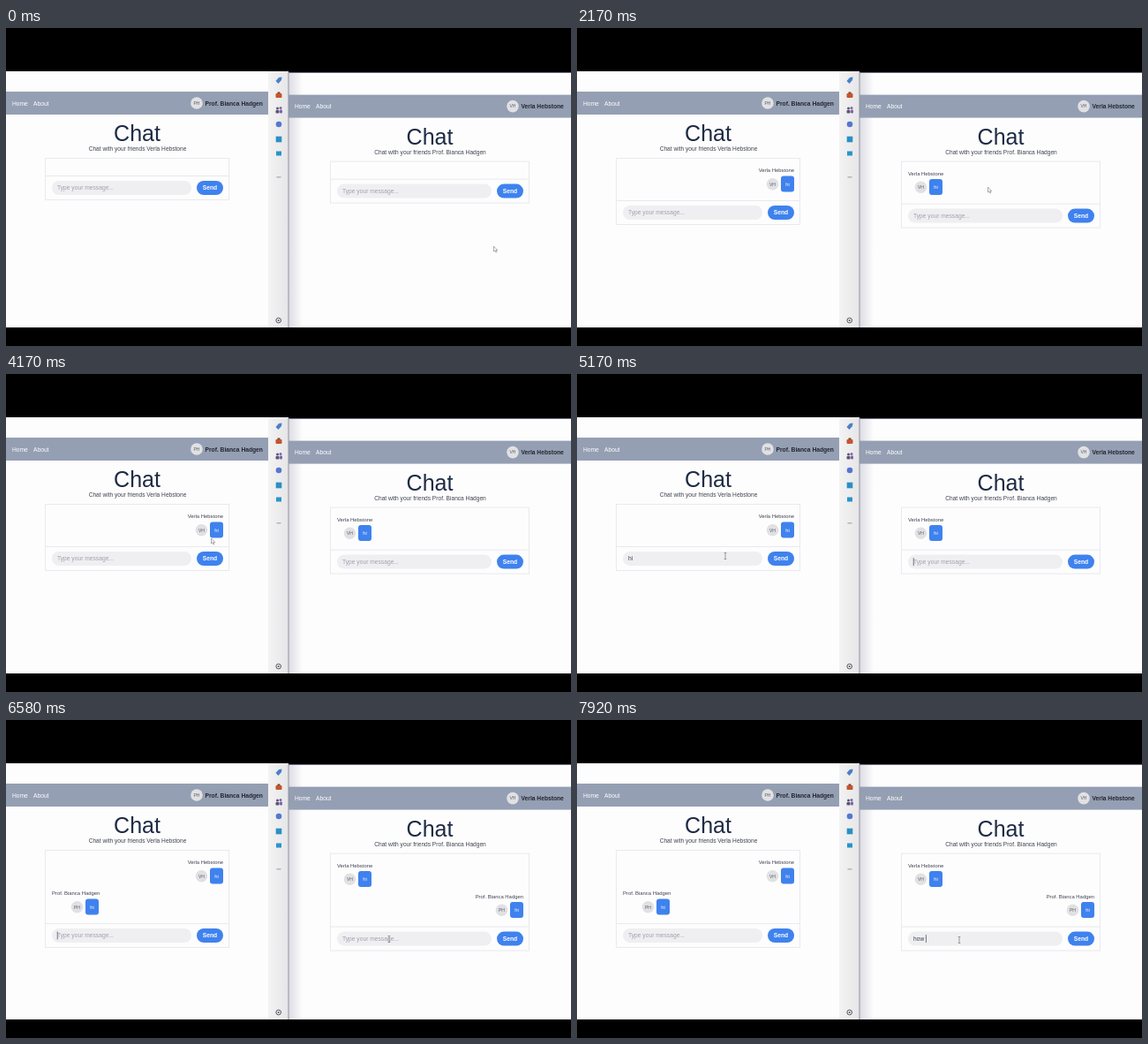
Write an HTML page that moves like this. It is 640 by 360 pixels and loops after 8 s.

```html
<!DOCTYPE html>
<html lang="en">
<head>
<meta charset="utf-8">
<title>Chat</title>
<style>
  html, body { margin: 0; width: 100%; height: 100%; overflow: hidden; background: #000; }
  svg { display: block; width: 640px; height: 360px; font: 6.7px "Liberation Sans", Arial, sans-serif; }
  text { white-space: pre; fill: #3f4450; }
  .title { font-size: 25px; fill: #1e2b45; }
  .sub { font-size: 6.6px; }
  .bold { font-weight: bold; fill: #23262f; }
  .link, .send { fill: #fff; }
  .send { font-weight: bold; }
  .name { font-size: 5.9px; }
  .mid { text-anchor: middle; }
  .end { text-anchor: end; }
  .initials { font-size: 5px; fill: #5a5d68; }
  .line { fill: none; stroke: #e9e9f0; }
</style>
</head>
<body>
<svg id="stage" viewBox="0 0 640 360"></svg>
<script>
const LOOP = 8000, BLUE = '#3f82ee', PAGE = '#fdfdfd', INK = '#555862';
const PROF = 'Prof. Bianca Hadgen', PAL = 'Verla Hebstone';
const initials = { [PROF]: 'PH', [PAL]: 'VH' };
const shifts = [0, 28, 63];
const sentAt = [1830, 5830];

const panels = [
  { x: 44, w: 209, y: 0, cx: 148.5, navX: 0, navW: 297, avatar: 216, me: PROF, peer: PAL,
    typed: [[0, ''], [4840, 'h'], [5000, 'hi'], [5830, '']],
    caret: [[4500, 4920], [5830, 6700]] },
  { x: 367, w: 226, y: 3.6, cx: 480, navX: 320, navW: 320, avatar: 574, me: PAL, peer: PROF,
    typed: [[0, ''], [1330, 'h'], [1420, 'hi'], [1750, ''],
            [7500, 'h'], [7580, 'ho'], [7750, 'how'], [7830, 'how ']],
    caret: [[1170, 1700], [4920, 5750], [7170, 8000]] }
];

// time, x, y of the pointer
const pointer = [
  [0, 554, 250], [500, 554, 250], [920, 466, 181], [1830, 466, 181], [2000, 467, 183],
  [3420, 467, 183], [4170, 234, 189], [4450, 168, 206], [5830, 168, 206],
  [6500, 434, 248], [LOOP, 433, 249]
];

const rect = (x, y, w, h, fill, more = '') =>
  `<rect x="${x}" y="${y}" width="${w}" height="${h}" fill="${fill}" ${more}/>`;
const dot = (x, y, r, fill) => `<circle cx="${x}" cy="${y}" r="${r}" fill="${fill}"/>`;
const text = (x, y, cls, str) => `<text x="${x}" y="${y}" class="${cls}">${str}</text>`;
const avatar = (x, y, who) =>
  dot(x, y, 6.8, '#e1e1e4') + text(x, y + 1.8, 'mid initials', initials[who]);
const fade = (id, from, to) =>
  `<linearGradient id="${id}"><stop stop-color="${from}"/><stop offset="1" stop-color="${to}"/></linearGradient>`;

function message(p, who, y, i) {
  const mine = who === p.me, left = p.x + 8, right = p.x + p.w - 7;
  const edge = mine ? left + (who === PAL ? 39 : 53) : right;
  return `<g class="msg${i}">` +
    text(mine ? left : right, y, mine ? 'name' : 'name end', who) +
    avatar(edge - 24.5, y + 13.7, who) +
    rect(edge - 15, y + 4.5, 15, 18, BLUE, 'rx="3"') +
    text(edge - 7.5, y + 15.6, 'mid name link', 'hi') + '</g>';
}

function panel(p) {
  const { x, w, y } = p, right = x + w - 7;
  return rect(p.navX, 72 + y, p.navW, 26, '#949fb3') +
    text(p.navX + 7, 87.5 + y, 'link', 'Home') +
    text(p.navX + 31, 87.5 + y, 'link', 'About') +
    avatar(p.avatar, 85 + y, p.me) +
    text(p.avatar + 9.5, 87.5 + y, 'bold', p.me) +
    text(p.cx, 128 + y, 'title mid', 'Chat') +
    text(p.cx + 0.5, 139 + y, 'sub mid', 'Chat with your friends ' + p.peer) +
    `<rect class="line box" x="${x + .5}" y="${147.5 + y}" width="${w - 1}"/>` +
    message(p, PAL, 163 + y, 0) + message(p, PROF, 198 + y, 1) +
    '<g class="form">' +
    `<path class="line" d="M${x} ${167.5 + y}h${w}"/>` +
    rect(x + 8, 173 + y, w - 51, 16, '#efeff2', 'rx="8"') +
    rect(right - 30, 173 + y, 30, 16, BLUE, 'rx="8"') +
    text(right - 15, 183.4 + y, 'mid send', 'Send') +
    text(x + 14, 183.4 + y, 'input', '') +
    rect(0, 176.5 + y, 0.8, 9, INK, 'class="caret"') + '</g>';
}

const sidebar = rect(297, 49, 23, 290, 'url(#side)') +
  '<path d="M305.5 60l3.5-4 3.5-.5-.5 3.5-3.5 4z" fill="#4a80c8"/>' +
  rect(305.5, 74, 7, 5, '#c4552c', 'rx="1"') + rect(307.5, 72.5, 3, 1.5, '#7a3c24') +
  dot(307.5, 91, 1.5, '#5a5472') + dot(311, 90.5, 1.5, '#7d66a8') +
  rect(305.5, 93, 4, 3.5, '#5a5472', 'rx="1"') + rect(310, 92.5, 3, 4, '#7d66a8', 'rx="1"') +
  dot(309, 109, 3.3, '#5577d0') +
  rect(305.7, 122.7, 6.6, 6.6, '#2a90c4') +
  rect(306, 139.5, 6, 5, '#2a94cc') +
  rect(306.5, 168.5, 5, 0.8, '#85858c') +
  `<circle cx="308.7" cy="331" r="2.8" fill="none" stroke="${INK}"/>` +
  dot(308.7, 331, 1, INK);

stage.innerHTML = '<defs>' + fade('side', '#f3f3f3', '#e6e6e8') + fade('shade', '#dcdce4', PAGE) + '</defs>' +
  rect(0, 0, 640, 360, '#000') +
  rect(0, 49, 320, 290, PAGE) + rect(320, 50, 320, 289, '#6c6c84') +
  rect(320, 51, 320, 288, PAGE) + rect(320, 51, 16, 288, 'url(#shade)') + sidebar +
  panels.map(p => `<g>${panel(p)}</g>`).join('') +
  rect(319.5, 50, 1, 289, '#94949e') +
  `<path id="arrow" d="M-1.5-3v6l1.4-1.2 1 2.2 1-.5-1-2h1.8z" fill="#fff" stroke="#777" stroke-width=".6"/>
   <path id="beam" d="M-1.3-3.5h2.6M0-3.5v7M-1.3 3.5h2.6" stroke="#777" stroke-width=".7"/>`;

panels.forEach((p, i) => {
  const g = stage.querySelectorAll(':scope > g')[i];
  for (const c of ['box', 'form', 'input', 'caret', 'msg0', 'msg1']) p[c + 'El'] = g.querySelector('.' + c);
});

const show = (el, on) => el.setAttribute('visibility', on ? 'visible' : 'hidden');

function pointerAt(t) {
  const i = Math.max(1, pointer.findIndex(k => k[0] > t));
  const [a, ax, ay] = pointer[i - 1], [b, bx, by] = pointer[i];
  const u = (t - a) / (b - a), s = u * u * (3 - 2 * u);
  return [ax + (bx - ax) * s, ay + (by - ay) * s];
}

function draw(now) {
  const t = now % LOOP, count = sentAt.filter(s => t >= s).length, shift = shifts[count];
  const [mx, my] = pointerAt(t);
  let overInput = false;
  for (const p of panels) {
    const value = p.typed.filter(k => t >= k[0]).pop()[1];
    p.boxEl.setAttribute('height', 47 + shift);
    p.formEl.setAttribute('transform', `translate(0 ${shift})`);
    show(p.msg0El, count > 0);
    show(p.msg1El, count > 1);
    p.inputEl.textContent = value || 'Type your message...';
    p.inputEl.style.fill = value ? '#3f4450' : '#a0a3ac';
    p.caretEl.setAttribute('x', p.x + 13.8 + (value ? p.inputEl.getComputedTextLength() : 0));
    show(p.caretEl, p.caret.some(([a, b]) => t >= a && t < b));
    overInput ||= mx > p.x + 8 && mx < p.x + p.w - 43 && Math.abs(my - 181 - p.y - shift) < 8;
  }
  for (const el of [arrow, beam]) el.setAttribute('transform', `translate(${mx} ${my})`);
  show(beam, overInput);
  show(arrow, !overInput);
}

const start = performance.now();
(function tick() {
  draw(performance.now() - start);
  requestAnimationFrame(tick);
})();
</script>
</body>
</html>
```
